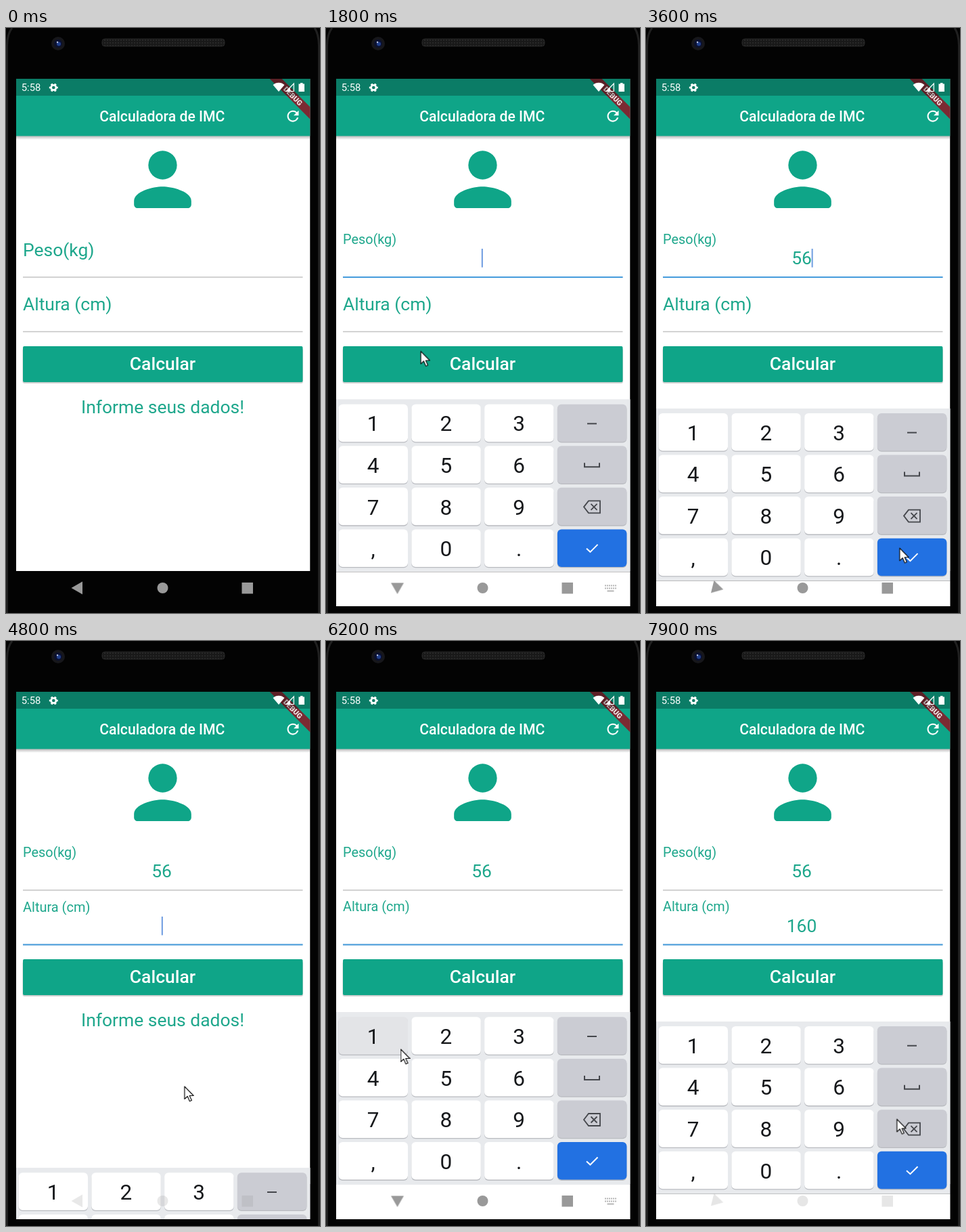
An HTML page for the animation above (8000 ms loop, 464 px wide and 864 px high).

```html
<!DOCTYPE html>
<html lang="pt">
<head>
<meta charset="utf-8">
<title>Calculadora de IMC</title>
<style>
html, body { margin: 0; width: 100%; height: 100%; overflow: hidden; background: #000; }
svg { display: block; width: 464px; height: 864px; font-family: Roboto, sans-serif; }
.big { font-size: 26.45px; fill: #1ea78c; }
.mid { text-anchor: middle; }
.bold { font-weight: 500; fill: #fff; }
.digit { font-size: 31.5px; fill: #16181b; text-anchor: middle; }
.ink { fill: none; stroke: #45474c; stroke-width: 2; }

/* One loop is 8 s, so 1% is 80 ms */
.anim { animation: 8s linear infinite; }
.step { animation: 8s step-end infinite; }
.label { transform-origin: 25px 0; }

#weight { animation-name: weight; }
#height { animation-name: height; }
@keyframes weight {
  0%, 17.7% { transform: none; animation-timing-function: cubic-bezier(.4, 0, .2, 1); }
  20.6%, 100% { transform: translateY(-18px) scale(.75); }
}
@keyframes height {
  0%, 57.4% { transform: none; animation-timing-function: cubic-bezier(.4, 0, .2, 1); }
  60.6%, 100% { transform: translateY(-18px) scale(.75); }
}
.label text { transform-box: view-box; }

#line1 { animation-name: line1; }
#line2 { animation-name: line2; }
@keyframes line1 { 0% { opacity: 0 } 17.5% { opacity: 1 } 46.25% { opacity: 0 } }
@keyframes line2 { 0% { opacity: 0 } 57.5% { opacity: 1 } 100% { opacity: 1 } }

#v5 { animation-name: v5; }
#v56 { animation-name: v56; }
#v1 { animation-name: v1; }
#v16 { animation-name: v16; }
#v160 { animation-name: v160; }
@keyframes v5 { 0% { opacity: 0 } 27.5% { opacity: 1 } 32.5% { opacity: 0 } }
@keyframes v56 { 0% { opacity: 0 } 32.5% { opacity: 1 } 100% { opacity: 1 } }
@keyframes v1 { 0% { opacity: 0 } 78.75% { opacity: 1 } 83.75% { opacity: 0 } }
@keyframes v16 { 0% { opacity: 0 } 83.75% { opacity: 1 } 90% { opacity: 0 } }
@keyframes v160 { 0% { opacity: 0 } 90% { opacity: 1 } 100% { opacity: 1 } }

#caret { animation-name: caret; }
@keyframes caret {
  0% { opacity: 0; transform: none; }
  17.5% { opacity: 1; transform: none; }
  23.75% { opacity: 0; transform: none; }
  27.5% { opacity: 1; transform: translateX(7.5px); }
  32.5% { opacity: 1; transform: translateX(14.8px); }
  38.75% { opacity: 0; transform: translateX(14.8px); }
  45% { opacity: 1; transform: translateX(14.8px); }
  46.25% { opacity: 0; transform: translateY(81px); }
  57.5% { opacity: 1; transform: translateY(81px); }
  63.75% { opacity: 0; transform: translateY(81px); }
  70% { opacity: 1; transform: translateY(81px); }
  76.25% { opacity: 0; transform: translateY(81px); }
  78.75% { opacity: 1; transform: translate(7.5px, 81px); }
  83.75% { opacity: 1; transform: translate(14.8px, 81px); }
  90% { opacity: 1; transform: translate(22.3px, 81px); }
  96.25%, 100% { opacity: 0; transform: translate(22.3px, 81px); }
}

#info { animation-name: info; }
@keyframes info { 0% { opacity: 1 } 22% { opacity: 0 } 47.5% { opacity: 1 } 62% { opacity: 0 } 100% { opacity: 0 } }

#board { animation-name: board; }
@keyframes board {
  0%, 19.1% { transform: translateY(306px); animation-timing-function: cubic-bezier(.4, 0, .2, 1); }
  22.68%, 44.45% { transform: none; animation-timing-function: cubic-bezier(.4, 0, 1, 1); }
  47.95%, 59.1% { transform: translateY(306px); animation-timing-function: cubic-bezier(.4, 0, .2, 1); }
  62.68%, 98.2% { transform: none; }
  98.75% { transform: translateY(13px); }
  99.4% { transform: translateY(50px); }
  100% { transform: translateY(104px); }
}

#k1 { animation-name: k1; }
#k5 { animation-name: k5; }
#k6 { animation-name: k6; }
#k0 { animation-name: k0; }
@keyframes k1 { 0% { fill: #fff } 77% { fill: #e3e4e7 } 79.5% { fill: #fff } }
@keyframes k5 { 0% { fill: #fff } 26.5% { fill: #e3e4e7 } 28.5% { fill: #fff } }
@keyframes k6 { 0% { fill: #fff } 32% { fill: #e3e4e7 } 34% { fill: #fff } 83% { fill: #e3e4e7 } 85% { fill: #fff } }
@keyframes k0 { 0% { fill: #fff } 89.5% { fill: #e3e4e7 } 91.5% { fill: #fff } }

#nav { animation-name: nav; }
@keyframes nav {
  0%, 18.75% { opacity: 1 } 20% { opacity: .22 } 22.5%, 45% { opacity: 1 }
  46.25% { opacity: .25 } 48.5%, 58.75% { opacity: 1 } 60% { opacity: .22 }
  62.5%, 97.5% { opacity: 1 } 98.75%, 100% { opacity: .25 }
}
#back { animation-name: back; transform-origin: 105.5px 827px; }
@keyframes back {
  0%, 20% { transform: rotate(0) } 22.3%, 44.2% { transform: rotate(-90deg) }
  45% { transform: rotate(-165deg) } 47.5%, 60% { transform: rotate(-360deg) }
  62.3%, 98% { transform: rotate(-450deg) } 98.75% { transform: rotate(-525deg) }
  100% { transform: rotate(-610deg) }
}
#switch { animation-name: switch; }
@keyframes switch { 0% { opacity: 0 } 22.4% { opacity: 1 } 44.5% { opacity: 0 } 62.4% { opacity: 1 } 98.2%, 100% { opacity: 0 } }

#mouse { animation-name: mouse; }
@keyframes mouse {
  0%, 8.7% { transform: translate(230px, 420px); opacity: 0; }
  8.75% { transform: translate(230px, 420px); opacity: 1; }
  11.25% { transform: translate(166px, 350px); }
  13.75%, 18.5% { transform: translate(168px, 345px); }
  22.5% { transform: translate(140px, 477px); }
  26.5%, 28.5% { transform: translate(172px, 650px); }
  32%, 35% { transform: translate(284px, 650px); }
  43%, 44.5% { transform: translate(378px, 771px); }
  45% { transform: translate(375px, 769px); }
  48.75% { transform: translate(330px, 540px); }
  52.5%, 57% { transform: translate(214px, 410px); }
  60% { transform: translate(264px, 658px); }
  66% { transform: translate(190px, 640px); }
  76%, 79% { transform: translate(110.5px, 603px); }
  83%, 85% { transform: translate(282px, 650px); }
  89.5%, 91.5% { transform: translate(176px, 770px); }
  96.5%, 98% { transform: translate(384px, 768px); }
  98.75% { transform: translate(371px, 707px); }
  100% { transform: translate(350px, 640px); opacity: 1; }
}
</style>
</head>
<body>
<svg viewBox="0 0 464 864">
  <defs>
    <clipPath id="screen"><rect x="15" y="75" width="434.5" height="778.5"/></clipPath>
    <clipPath id="status"><rect x="15" y="75" width="434.5" height="25"/></clipPath>
    <linearGradient id="fade" x2="0" y2="1">
      <stop stop-color="#000" stop-opacity=".3"/><stop offset="1" stop-color="#000" stop-opacity="0"/>
    </linearGradient>
    <pattern id="mesh" width="4" height="4" patternUnits="userSpaceOnUse">
      <rect width="4" height="4" fill="#191919"/><circle cx="2" cy="2" r="1" fill="#2c2c2c"/>
    </pattern>
  </defs>

  <!-- Phone body -->
  <rect width="464" height="864" fill="#030303"/>
  <path d="M1.5 864V26Q2 8 9 0M462.500 864V26Q462 8 456 0" fill="none" stroke="#202020" stroke-width="3"/>
  <rect x="142" y="16" width="181" height="11" rx="4" fill="url(#mesh)" stroke="#262626"/>
  <circle cx="77" cy="23" r="10" fill="#17171b"/>
  <circle cx="77" cy="23" r="6" fill="#0b1130"/>
  <circle cx="78" cy="23.500" r="3" fill="#21408c"/>
  <circle cx="76" cy="21" r="1.200" fill="#b9c4e6"/>

  <g clip-path="url(#screen)">
    <rect x="15" y="75" width="434.500" height="727" fill="#fff"/>
    <rect x="15" y="159" width="434.500" height="6" fill="url(#fade)"/>
    <rect x="15" y="75" width="434.500" height="84.500" fill="#0fa588"/>
    <text class="bold" x="138.200" y="138.300" font-size="21.160">Calculadora de IMC</text>
    <path transform="translate(411.300 117.500) scale(1.058)" fill="#fff" d="M17.650 6.350A7.958 7.958 0 0 0 12 4c-4.420 0-7.990 3.580-7.990 8s3.570 8 7.990 8c3.730 0 6.840-2.550 7.730-6h-2.080A5.990 5.990 0 0 1 12 18c-3.310 0-6-2.690-6-6s2.690-6 6-6c1.660 0 3.140.690 4.220 1.780L13 11h7V4l-2.350 2.350z"/>
    <g transform="translate(449.500 75) rotate(45)">
      <rect x="-60" y="29.600" width="120" height="12.700" fill="#7b2a33"/>
      <text class="mid" y="39.800" font-size="10.800" font-weight="900" fill="#efe4e4">DEBUG</text>
    </g>
    <rect x="15" y="75" width="434.500" height="25" fill="#000" fill-opacity=".25"/>

    <!-- Status icons -->
    <text x="22.800" y="93.300" font-size="14.800" fill="#fff">5:58</text>
    <g fill="none" stroke="#fff">
      <circle cx="70.300" cy="88" r="3.700" stroke-width="2.800"/>
      <circle cx="70.300" cy="88" r="5.400" stroke-width="2.200" pathLength="12" stroke-dasharray="1" stroke-dashoffset=".5"/>
    </g>
    <g fill="#fff">
      <path d="M394.500 84a12.500 12.500 0 0 1 17 0l-8.500 10z"/>
      <path d="M420 87.500V94h-6.500z"/>
      <path d="M425.300 82v11.500h-11z" fill="none" stroke="#fff" stroke-width="1.200"/>
      <path d="M432.500 82.500h2.500v-1.500h3.500v1.500h2.500v11.500h-8.500z"/>
    </g>

    <g transform="translate(168 160.200) scale(5.290)" fill="#0fa588">
      <circle cx="12" cy="8" r="4"/>
      <path d="M12 14c-2.670 0-8 1.340-8 4v1c0 .550.450 1 1 1h14c.550 0 1-.450 1-1v-1c0-2.660-5.330-4-8-4z"/>
    </g>

    <!-- Form -->
    <path d="M25 368h413.500M25 448.500h413.500" stroke="#c3c3c3" stroke-width="1.400"/>
    <path id="line1" class="step" d="M25 368h413.500" stroke="#459bdc" stroke-width="2"/>
    <path id="line2" class="step" d="M25 448.500h413.500" stroke="#459bdc" stroke-width="2"/>
    <g transform="translate(0 336.500)"><g id="weight" class="anim label"><text class="big" x="25">Peso(kg)</text></g></g>
    <g transform="translate(0 417.300)"><g id="height" class="anim label"><text class="big" x="25">Altura (cm)</text></g></g>
    <g class="big mid">
      <text id="v5" class="step" x="230" y="349.300">5</text>
      <text id="v56" class="step" x="230" y="349.300">56</text>
      <text id="v1" class="step" x="230" y="430">1</text>
      <text id="v16" class="step" x="230" y="430">16</text>
      <text id="v160" class="step" x="230" y="430">160</text>
    </g>
    <rect id="caret" class="step" x="229.800" y="326" width="2" height="27.500" fill="#6c9be0"/>

    <rect x="24.500" y="473" width="414.500" height="52" rx="3" fill="#000" fill-opacity=".18"/>
    <rect x="25" y="470" width="413.500" height="53" rx="2" fill="#0fa588"/>
    <text class="bold mid" x="231.500" y="505.300" font-size="26.450">Calcular</text>
    <text id="info" class="step big mid" x="231.500" y="568.500">Informe seus dados!</text>

    <!-- Keypad -->
    <g id="board" class="anim">
      <rect x="15" y="548" width="434.500" height="255" fill="#e8eaed"/>
      <rect x="15" y="803" width="434.500" height="60" fill="#fff"/>
      <g id="keys"></g>
      <g class="ink">
        <path d="M386 584h14"/>
        <path d="M382 642v6h22v-6"/>
        <path d="M388 698h17v18h-17l-7-9zM391.500 702.500l9 9m0-9l-9 9" stroke-width="1.800"/>
        <path d="M385 768.500l5.500 5 11-11" stroke="#fff"/>
      </g>
    </g>

    <g id="nav" class="anim" fill="#999">
      <path id="back" class="anim" d="M96.500 827l16.500-9.500v19z"/>
      <circle cx="231.500" cy="827" r="8"/>
      <rect x="348.500" y="819" width="16.500" height="16.500"/>
      <g id="switch" class="step" fill="none" stroke="#b5b5b5" stroke-width="2">
        <path d="M412 823.500h17M412 827.500h17" stroke-dasharray="2 1"/>
        <path d="M415.500 831.500h10"/>
      </g>
    </g>
  </g>

  <path id="mouse" class="anim" d="M0 0V18.500l4.300-4 3.200 7.300 3-1.300-3.200-7h6z" fill="#fff" stroke="#111" stroke-width="1.200" stroke-linejoin="round"/>
</svg>
<script>
const keys = document.getElementById("keys");
const rows = ["123-", "456_", "789<", ",0.+"];
const pressable = "1560";
let out = "";
rows.forEach((row, r) => [...row].forEach((ch, c) => {
  const x = 18.500 + c * 107.800, y = 555.300 + r * 61.600;
  const box = `x="${x}" width="102.500" height="55.500" rx="6"`;
  const fill = c < 3 ? "#fff" : r < 3 ? "#cbccd3" : "#2271e2";
  const live = pressable.includes(ch) ? `id="k${ch}" class="step"` : "";
  out += `<rect ${box} y="${y + 1.300}" fill="#b9bbc0"/><rect ${box} y="${y}" fill="${fill}" ${live}/>`;
  if (c < 3) out += `<text class="digit" x="${x + 51}" y="${y + 39.800}">${ch}</text>`;
}));
keys.innerHTML = out;
</script>
</body>
</html>
```
